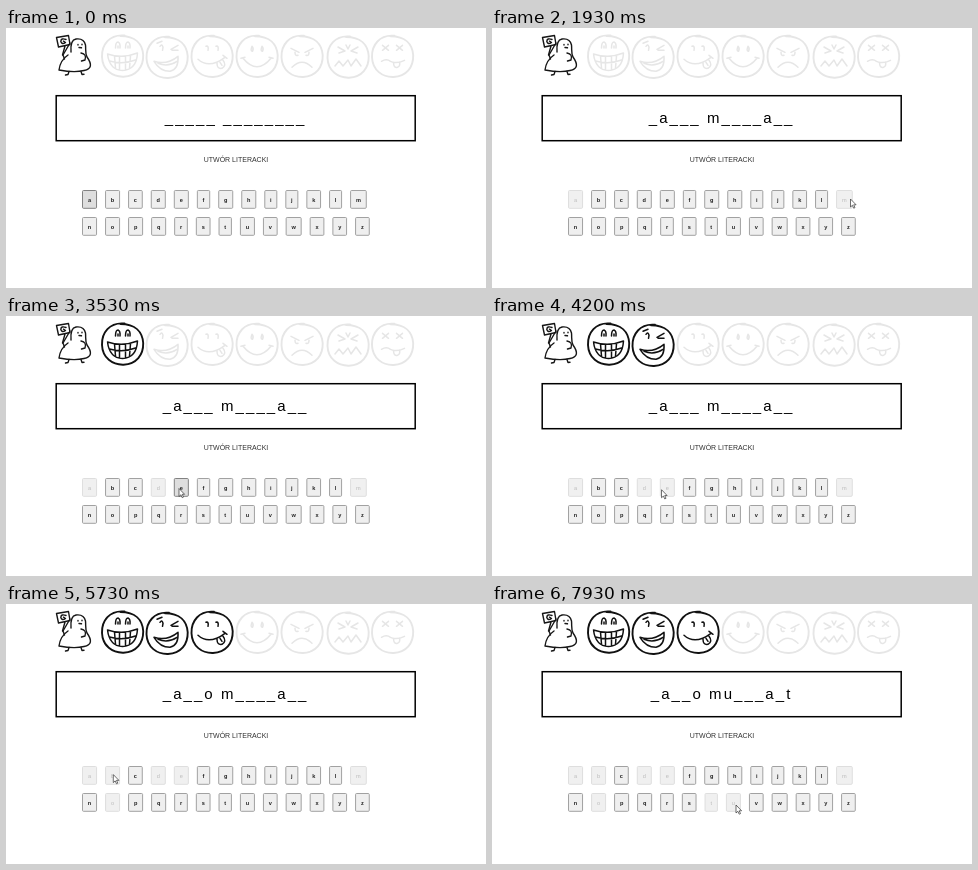
Write an HTML page that moves like this. It is 480 by 260 pixels and loops after 8000 ms.

```html
<!DOCTYPE html>
<html lang="pl">
<head>
<meta charset="utf-8">
<style>
html, body { margin: 0; width: 100%; height: 100%; overflow: hidden; background: #fff; }
svg { display: block; width: 480px; height: 260px; }
text { font-family: "Liberation Sans", Arial, sans-serif; text-anchor: middle; }
.doodle { fill: none; stroke: #161616; stroke-width: 1.4; stroke-linecap: round; stroke-linejoin: round; }
.face { stroke: #e6e6e6; stroke-width: 1.5; }
.face.on { stroke: #111; }
.face .rim { stroke-width: 1.9; }
.word { font-size: 15px; letter-spacing: 2.07px; }
.title { font-size: 7px; fill: #333; }
.key rect { fill: #efefef; stroke: #989898; stroke-width: .9; }
.key text { font-size: 5.6px; font-weight: bold; fill: #222; }
.key.hover rect { fill: #dedede; stroke: #777; }
.key.active rect { fill: #f5f5f5; stroke: #b4b4b4; }
.key.off rect { fill: #f0f0f0; stroke: #dcdcdc; }
.key.off text { fill: #bbb; font-weight: normal; }
</style>
</head>
<body>
<svg viewBox="0 0 480 260">
  <rect width="480" height="260" fill="#fff"/>
  <g class="doodle">
    <path d="M50.5 9.5L62.5 7.5 64 16.5 52.5 19ZM59 18L56.5 27"/>
    <path d="M60 11.5Q55 9.5 54.8 13.5 56 17 59.5 14.5L57.5 13.2"/>
    <path d="M65 24Q64 12 70 11 78 10 79.500 17C80 22 79 25 81 29 86 36 86 41 78 42.500 70 44.500 61 43.500 53 42 54 34 59 29 62 27 64 26 65 24"/>
    <path d="M64 15L57 27 58.500 31M75 25Q81 26 79 32L75.500 33"/>
    <path d="M72 16.500v.5M76 16.300v.5M73 19.500l2.500.3"/>
    <path d="M63 43.500L62 46.500 59.500 47M75 43.500L76 46.500 78 46.300"/>
  </g>
  <g id="faces"></g>
  <rect x="50.200" y="67.700" width="359" height="45" fill="none" stroke="#000" stroke-width="1.500"/>
  <text class="word" id="word" x="229.600" y="95"></text>
  <text class="title" x="230" y="133.500">UTWÓR LITERACKI</text>
  <g id="keys"></g>
  <path id="cursor" d="M0 0V8L1.900 6.300 3.200 9.200 4.500 8.600 3.200 5.800H5.600Z" fill="#fff" stroke="#333" stroke-width=".7"/>
</svg>
<script>
const LOOP = 8000, STEP = 1000 / 15, PRESS = 130;
const $ = id => document.getElementById(id);

function add(parent, tag, attrs, text = "") {
  const node = document.createElementNS("http://www.w3.org/2000/svg", tag);
  for (const name in attrs) node.setAttribute(name, attrs[name]);
  node.textContent = text;
  return parent.appendChild(node);
}

// Each guess: letter, time, and the slots it fills (none for a miss).
const guesses = [
  ["a", 200, [1, 11]], ["m", 1930, [6]], ["d", 3130, []], ["e", 3800, []],
  ["o", 4800, [4]], ["b", 5670, []], ["t", 6670, [13]], ["u", 7670, [7]]
];
const misses = guesses.filter(g => !g[2].length);
const pressTime = Object.fromEntries(guesses);

// Face centre and features, relative to that centre.
const faces = [
  [116.5, 28, "M-15-2Q0 3 15-3 14 14 0 14.500-13 14-15-2M-13 5Q0 9 13 4M-8 0L-7 12M-3 1V14M3 1V14M8 0L7 12M-7-8Q-7-14-4.500-14-2-13-2.500-8M3-8Q3-14 5.500-14 8-13 7.500-8M-4.500-10v2M5.500-10v2"],
  [161, 29.3, "M-13 4Q0 8 11-1 12 12 3 14-7 14-13 4M-9 6Q1 10 10 4M-7-11Q-5-14-4-10L-4.500-7M4-8L11-12M5-7L11-7M-10-14L-5-16"],
  [206, 28.3, "M-14 3Q-3 13 13 1M11-1L15 2M-6-10Q-3-11-4-6M4-10Q7-11 6-6M5 7Q5 13 10 12 15 9 11 4M8 6L10 9"],
  [251, 28.3, "M-14 2Q0 19 14 2M-16 2L-12 1M12 1L16 2M-5-10Q-7-5-4.500-5-3-8-5-10M5-10Q3-5 5.500-5 7-8 5-10"],
  [296, 28.3, "M-10 11Q0 1 10 11M-11-8L-3-4M11-8L3-4M-7-4Q-7 0-4-1M7-4Q7 0 4-1"],
  [342, 29, "M-13 9L-9 4-5 9 0 3 3 9 8 2 13 9M-10-10L-3-6-9-4M10-10L3-6 9-4M-2-12L0-8 2-12"],
  [386.5, 28.3, "M-11 5Q-6 2-2 5 4 8 12 4M-10-11L-4-6M-4-11L-10-6M4-11L10-6M10-11L4-6M1 6Q1 12 5 11 8 10 7 6"]
].map(([x, y, features]) => {
  const group = add($("faces"), "g", { class: "doodle face", transform: `translate(${x} ${y})` });
  add(group, "path", { class: "rim", d: "M2-20.500C-13-22-21-11-20.500 1-20 14-10 21 1 20.700 14 20 21 11 20.700-1 20-12 13-20-2-20" });
  add(group, "path", { d: features });
  return group;
});

// Letter advances in em, so that narrow letters get narrow keys.
const advances = [["ijl", .222], ["ft", .278], ["r", .333], ["cksvxyz", .5], ["w", .722], ["m", .833]];
const advance = letter => (advances.find(([set]) => set.includes(letter)) || [0, .556])[1];

const keys = [["abcdefghijklm", 162.5], ["nopqrstuvwxyz", 189.5]].flatMap(([row, y]) => {
  let x = 76.5;
  return [...row].map(letter => {
    const w = 10.7 + 6 * advance(letter), h = 17.8;
    const node = add($("keys"), "g", { class: "key" });
    add(node, "rect", { x, y, width: w, height: h, rx: 1 });
    add(node, "text", { x: x + w / 2, y: y + 11 }, letter);
    const key = { letter, node, x, y, w, h };
    x += w + 9;
    return key;
  });
});

// Pointer path: time, x, y.
const path = [
  [0, 82, 170], [333, 82, 170], [800, 159, 184], [1200, 305, 190], [1400, 369, 175],
  [1533, 369, 175], [1800, 358.5, 171], [2067, 358.5, 171], [2930, 152, 171.5],
  [3200, 152, 171.5], [3530, 173, 172.5], [4133, 173, 172.5], [4667, 101, 198],
  [5067, 101, 198], [5467, 105, 170], [5670, 105, 170], [6470, 219.5, 198.5],
  [6867, 219.5, 198.5], [6933, 222.5, 200], [7000, 222.5, 200], [7200, 243, 202],
  [7333, 243, 202], [7400, 241.5, 201], [7867, 241.5, 201], [7930, 244, 201]
];

function pointerAt(t) {
  const i = path.findIndex(p => p[0] > t);
  if (i < 0) return path[path.length - 1].slice(1);
  const [t0, x0, y0] = path[i - 1], [t1, x1, y1] = path[i];
  const k = (t - t0) / (t1 - t0), e = k * k * (3 - 2 * k);
  return [x0 + (x1 - x0) * e, y0 + (y1 - y0) * e];
}

function keyState(key, t, px, py) {
  const press = pressTime[key.letter];
  if (t >= press) return "off";
  if (t >= press - PRESS) return "active";
  const inside = px >= key.x && px <= key.x + key.w && py >= key.y && py <= key.y + key.h;
  return inside ? "hover" : "";
}

function render(ms) {
  const t = Math.floor((ms % LOOP + 4) / STEP) * STEP + 4;
  const [px, py] = pointerAt(t);
  $("cursor").setAttribute("transform", `translate(${px} ${py})`);
  $("cursor").style.display = t < 400 ? "none" : "";

  const word = [..."_____ ________"];
  for (const [letter, time, slots] of guesses)
    if (t >= time) for (const slot of slots) word[slot] = letter;
  $("word").textContent = word.join("");

  for (const key of keys) key.node.setAttribute("class", "key " + keyState(key, t, px, py));
  faces.forEach((face, i) => face.classList.toggle("on", i < misses.length && t >= misses[i][1]));
}

const start = performance.now();
function tick() {
  render(performance.now() - start);
  requestAnimationFrame(tick);
}
tick();
</script>
</body>
</html>
```
